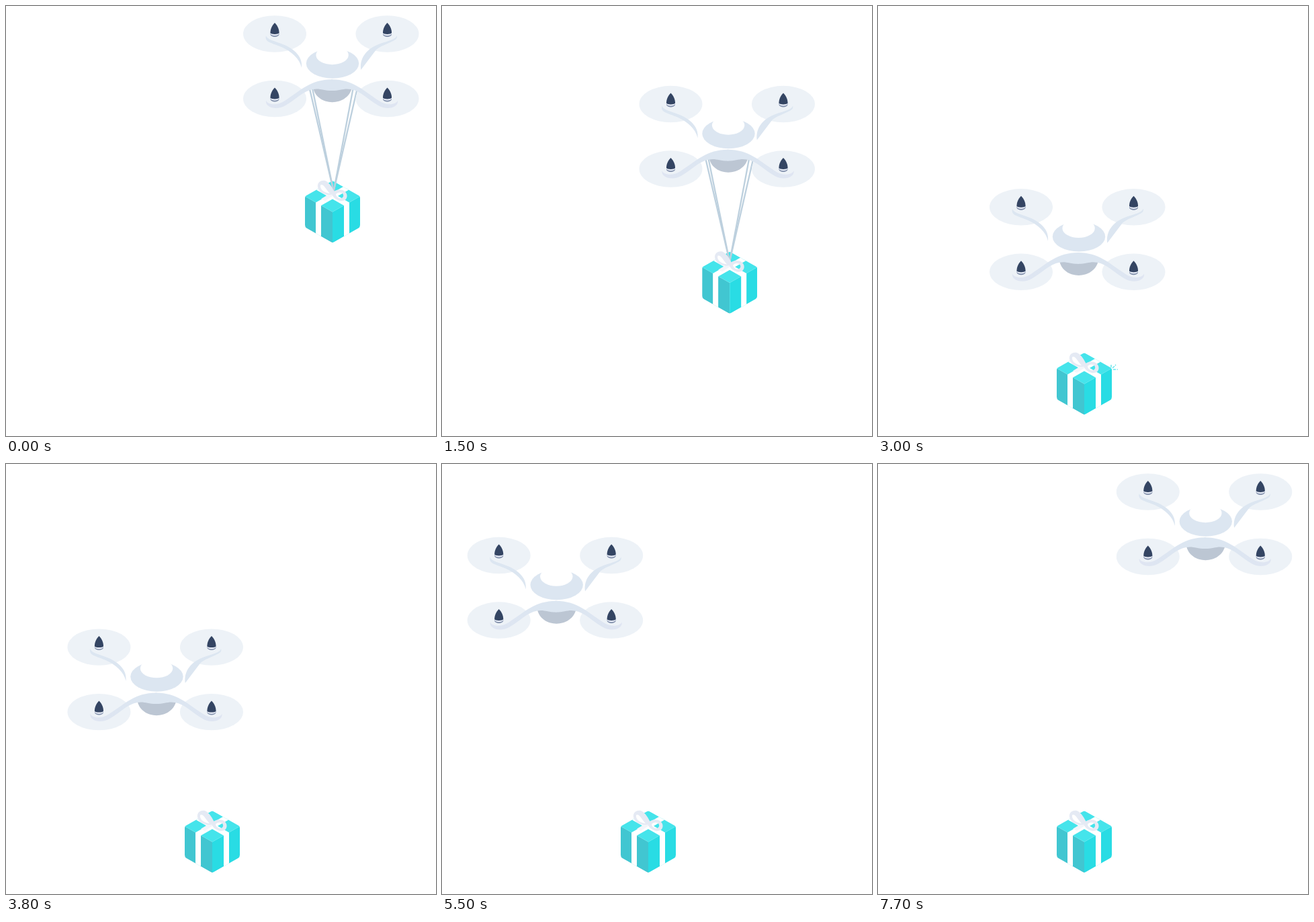
Write an HTML page with a canvas that moves like this. It is 640 px wide and 640 px high and loops after 7.8 s.

```html
<!DOCTYPE html>
<html lang="en">
<head>
<meta charset="utf-8">
<title>Drone delivery</title>
<style>
html, body { margin: 0; width: 100%; height: 100%; overflow: hidden; background: #fff; }
canvas { display: block; }
</style>
</head>
<body>
<canvas id="stage" width="640" height="640"></canvas>
<script>
const ctx = document.getElementById('stage').getContext('2d');
const LOOP = 7800, STEP = 100, LAND = 2900, SPARK_END = 3400;
const WHITE = '#fff', BODY = '#dce6f1', BOW = '#e5eaf4';
const GROUND = [-179, 256];

// Key points of the flight: time, x offset, y offset
const flight = [
  [0, 0, 0], [800, -22, 36.4], [1600, -66, 115.5], [2200, -110.5, 186],
  [3000, -187, 257.8], [4000, -278, 218.5], [4800, -332, 159.5],
  [5150, -344, 127], [5600, -304, 86.5], [6400, -188, 48.5], [7700, 1.8, 0]
];

// Smooth curve through the key points, with parabolic ends
function slope(k, i, a) {
  const sec = j => (k[j + 1][a] - k[j][a]) / (k[j + 1][0] - k[j][0]);
  const last = k.length - 1;
  if (i === 0) return 2 * sec(0) - slope(k, 1, a);
  if (i === last) return 2 * sec(last - 1) - slope(k, last - 1, a);
  const h0 = k[i][0] - k[i - 1][0], h1 = k[i + 1][0] - k[i][0];
  return (h1 * sec(i - 1) + h0 * sec(i)) / (h0 + h1);
}

function along(k, t) {
  let i = 0;
  while (i < k.length - 2 && t > k[i + 1][0]) i++;
  const h = k[i + 1][0] - k[i][0], u = (t - k[i][0]) / h, v = 1 - u;
  return [1, 2].map(a =>
    k[i][a] * v * v * (1 + 2 * u) + k[i + 1][a] * u * u * (3 - 2 * u) +
    h * u * v * (slope(k, i, a) * v - slope(k, i + 1, a) * u));
}

// The load hangs from the drone with a slight lag until it lands
function loadPos(t, [x, y]) {
  if (t >= LAND) return GROUND;
  const lag = Math.max(0, Math.sin(Math.PI * t / 2200));
  return [x + 2 * lag, y + 1.2 * lag];
}

function fill(d, color, rule) {
  ctx.fillStyle = color;
  ctx.fill(new Path2D(d), rule || 'nonzero');
}

function oval(x, y, rx, ry, color) {
  ctx.fillStyle = color;
  ctx.beginPath();
  ctx.ellipse(x, y, rx, ry, 0, 0, Math.PI * 2);
  ctx.fill();
}

function line(x1, y1, x2, y2, width, color) {
  ctx.strokeStyle = color;
  ctx.lineWidth = width;
  ctx.beginPath();
  ctx.moveTo(x1, y1);
  ctx.lineTo(x2, y2);
  ctx.stroke();
}

function at([x, y], draw, flip = 1) {
  ctx.save();
  ctx.translate(x, y);
  ctx.scale(flip, 1);
  draw();
  ctx.restore();
}

function eachHub(draw) {
  for (const y of [41.5, 138]) {
    for (const x of [400, 567.5]) at([x, y], draw);
  }
}

function motor() {
  fill('M-6.5-2 H6.5 V1 C5.5 5.6-5.5 5.6-6.5 1Z', '#7f8da9');
  fill('M-6.5-2 H6.5 V-.2 C5 3.8-5 3.8-6.5-.2Z', '#e6ebf6');
  fill('M0-16.5 C4.5-12 6.8-6 6.5-1.2 C4.5 1-4.5 1-6.5-1.2 C-6.8-6-4.5-12 0-16.5Z', '#344563');
}

// Left half of the front arm, measured from the middle
function frontArm() {
  const shade = ctx.createLinearGradient(-98, 0, -30, 0);
  shade.addColorStop(0, '#dfe5f2');
  shade.addColorStop(1, BODY);
  fill('M-98 140.5 C-96 147-81 149-70 141 C-47 126-31 109.3 0 109.3 H1 V126 H0 ' +
    'C-13 126-18 122-28 124 C-42 126-55 140-69 148 C-82 156-100 151-98 140.5Z', shade);
}

function drone() {
  eachHub(() => oval(0, 0, 47, 27.2, '#edf2f7'));

  fill('M387 44 C388 50 400 52 412 57 C430 64 442 76 440 92 C437 78 425 68 410 61 C396 55 384 54 387 44Z', BODY);
  fill('M581.5 44 C581 49 569 52 557 56 C537 63 526 77 528.3 95 L551 65 C558 59 567 57 576 52 C581 50 583 47 581.5 44Z', BODY);

  oval(486, 85.5, 39.2, 22.2, BODY);
  oval(485.6, 73, 24.2, 14.2, WHITE);

  fill('M457 121 C462 150.5 509 150.5 515 121Z', '#bcc6d3');
  for (const side of [1, -1]) at([485, 0], frontArm, side);

  eachHub(motor);
}

function cables() {
  for (const x of [452, 456.2, 516.5, 522.6]) line(x, 123.5, 487.6, 276, 2.3, '#bdd0de');
}

// Box coordinates: u and v run 0..1 across the lid, drop is the way down
function face(color, ...corners) {
  ctx.fillStyle = color;
  ctx.beginPath();
  for (const [u, v, drop = 0] of corners) {
    ctx.lineTo(486 + 41 * (u - v), 260 + 23.3 * (u + v) + drop);
  }
  ctx.fill();
}

function box() {
  const H = 46, a = 0.39, b = 0.585;
  ctx.save();
  ctx.clip(new Path2D('M482 262 Q486 259 490 262 L524.5 281 Q527 283 527 285.5 V326 Q527 329 524.5 331 ' +
    'L489 351 Q486 353 483 351 L447.5 331 Q445 329 445 326 V285.5 Q445 283 447.5 281Z'));
  face('#41c6d1', [0, 1], [1, 1], [1, 1, H], [0, 1, H]);
  face('#29dce4', [1, 0], [1, 1], [1, 1, H], [1, 0, H]);
  face('#45e4eb', [0, 0], [1, 0], [1, 1], [0, 1]);
  face(WHITE, [a, 0], [b, 0], [b, 1], [b, 1, H], [a, 1, H], [a, 1]);
  face(WHITE, [0, a], [0, b], [1, b], [1, b, H], [1, a, H], [1, a]);
  ctx.restore();
}

function bow() {
  fill('M469 287 L484 278 L489 281 L475 290Z', '#f3f5fa');
  fill('M488 280 C472 285 460 272 465 263.5 C467 259.5 474 258.5 477 261 C482 264 486 271 489 277Z', BOW);
  fill('M482 279 C471 278 466 270 468.5 266 C473 265 475 271 482 279Z', WHITE);
  fill('M485 278 C495 269 506 274 507.4 281 C508.5 288 503 291 497 290 C490 288 485 283 485 278Z ' +
    'M491 280 C495 276 501 277 502 281 C503 285 499 287 496 286 C493 285 491 283 491 280Z', BOW, 'evenodd');
}

// Three small dashed rays at the landing corner
function sparkle(t) {
  const p = (t - LAND) / (SPARK_END - LAND);
  if (p <= 0 || p >= 1) return;
  const r = 2 + 5 * p;
  ctx.save();
  ctx.translate(347, 541);
  ctx.globalAlpha = Math.min(1, 1.6 * (1 - p));
  ctx.rotate(-Math.PI / 2);
  for (let i = 0; i < 3; i++) {
    line(r, 0, r + 4, 0, 1.2, '#45dfe8');
    if (i) line(r + 5.5, 0, r + 7, 0, 1.2, '#45dfe8');
    ctx.rotate(Math.PI / 4);
  }
  ctx.restore();
}

function render(now) {
  const t = Math.floor((now % LOOP) / STEP) * STEP;
  const air = along(flight, t), load = loadPos(t, air);
  ctx.fillStyle = WHITE;
  ctx.fillRect(0, 0, 640, 640);
  at(load, box);
  if (t < LAND) at(air, cables);
  at(load, bow);
  sparkle(t);
  at(air, drone);
  requestAnimationFrame(render);
}
requestAnimationFrame(render);
</script>
</body>
</html>
```
